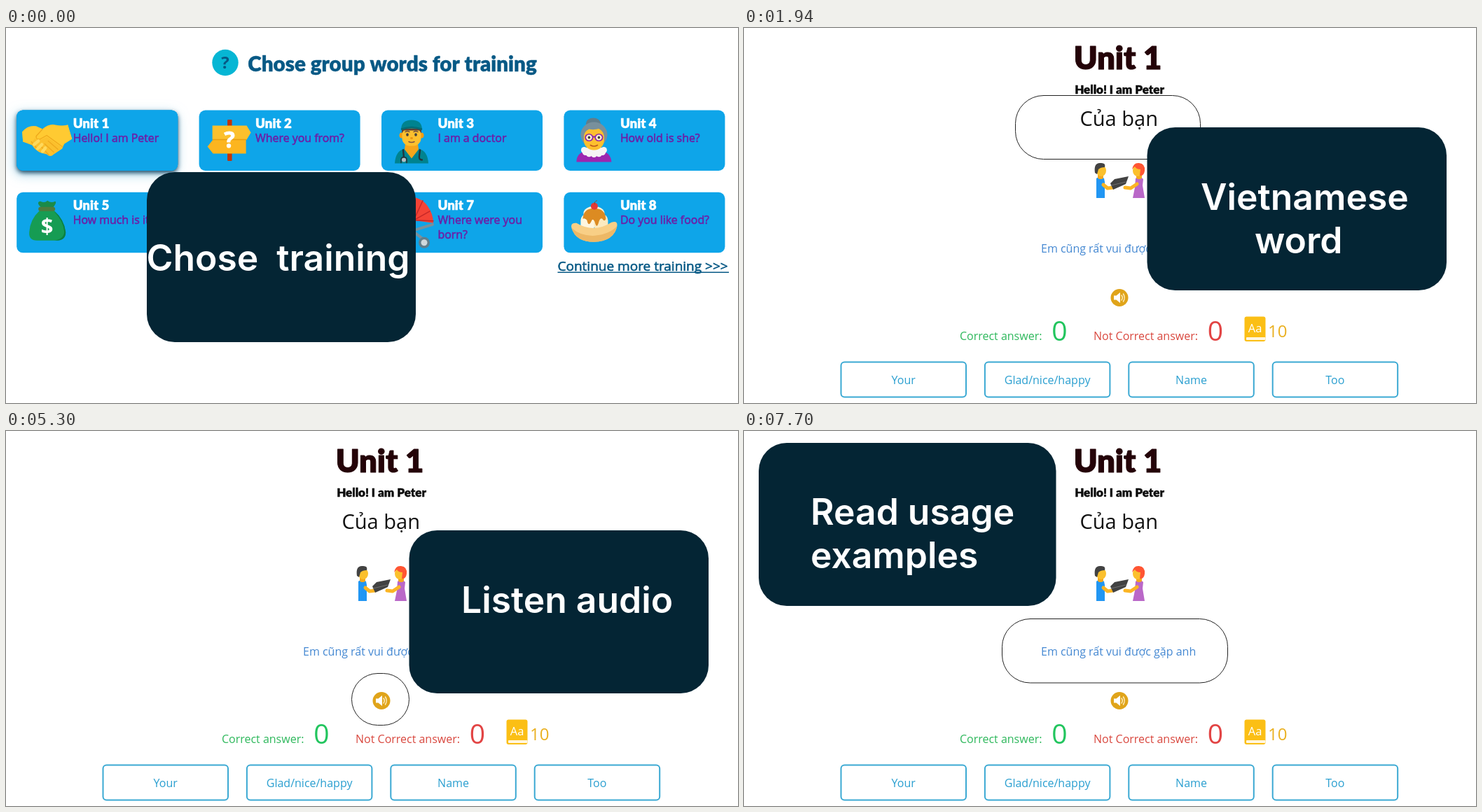
Recreate the animation shown at these times as an HTML page with a canvas. Size 1045x536 px, loop 8 s.

```html
<!DOCTYPE html>
<html lang="en">
<head>
<meta charset="utf-8">
<title>Word training</title>
<style>
html, body { margin: 0; width: 100%; height: 100%; overflow: hidden; background: #fff; }
canvas { display: block; width: 1045px; height: 536px; }
</style>
</head>
<body>
<canvas id="stage"></canvas>
<script>
const W = 1045, H = 536, LOOP = 8000;
const NAVY = '#042534', SKY = '#0ea5e9', DEEP = '#075985', GOLD = '#fcc02e';
const canvas = document.getElementById('stage');
const ctx = canvas.getContext('2d');
const ratio = window.devicePixelRatio || 1;
canvas.width = W * ratio;
canvas.height = H * ratio;

const sans = (size, weight = 400) => `${weight} ${size}px "Open Sans", sans-serif`;
const inter = size => `600 ${size}px Inter, sans-serif`;
const chunky = size => `900 ${size}px Lato, sans-serif`;

// bold adds a thin round outline to soften and thicken the letters
function text(str, x, y, font, color, { align = 'left', bold = 0 } = {}) {
  ctx.font = font;
  ctx.textAlign = align;
  ctx.fillStyle = ctx.strokeStyle = color;
  ctx.fillText(str, x, y);
  if (bold) {
    ctx.lineWidth = bold;
    ctx.lineJoin = 'round';
    ctx.strokeText(str, x, y);
  }
}

function box(x, y, w, h, r, fill) {
  ctx.beginPath();
  ctx.roundRect(x, y, w, h, r);
  ctx.fillStyle = fill;
  ctx.fill();
}

function frame(x, y, w, h, r, color, width) {
  ctx.beginPath();
  ctx.roundRect(x, y, w, h, r);
  ctx.strokeStyle = color;
  ctx.lineWidth = width;
  ctx.stroke();
}

function oval(x, y, rx, ry, fill) {
  ctx.beginPath();
  ctx.ellipse(x, y, rx, ry, 0, 0, Math.PI * 2);
  ctx.fillStyle = fill;
  ctx.fill();
}

function shape(d, fill) {
  ctx.fillStyle = fill;
  ctx.fill(new Path2D(d));
}

function line(d, color, width) {
  ctx.strokeStyle = color;
  ctx.lineWidth = width;
  ctx.lineCap = ctx.lineJoin = 'round';
  ctx.stroke(new Path2D(d));
}

// Icons, drawn from the top left corner of their card
const icons = {
  handshake() {
    shape('M8 31Q16 21 28 23L37 27Q46 19 55 21Q66 23 73 21L79 41L68 48L65 55L53 63Q48 68 43 63L35 61Q27 58 22 50L9 45Z', '#fbc02d');
    shape('M8 31Q16 21 28 23L37 27L27 37Q25 45 35 42L43 38L64 53L68 48L79 41L73 21Q62 24 53 21Q44 20 34 30L20 48L9 45Z', '#ffca32');
    line('M37 27L28 37Q27 43 34 41L43 36L65 52M45 44L59 56M40 48L53 60M35 52L46 64M21 45L30 56', '#efa91c', 1.3);
    line('M25 49L31 44M30 55L36 49M37 59L41 54', '#ffd95c', 4.5);
  },
  sign() {
    box(40.5, 13.5, 6.5, 59, 1, '#bf360c');
    shape('M19 22H68L74 32L68 42H19Z', '#fbc02d');
    shape('M20 42H67V62H20L12 52Z', '#fcb51f');
    line('M20 42H67', '#e79d10', 1.5);
    text('?', 43.5, 53, sans(32, 700), '#fff', { align: 'center', bold: 1 });
  },
  doctor() {
    shape('M19 76Q20 58 33 55H53Q66 58 67 76Z', '#00838f');
    shape('M34 48H52L53 56L43 69L33 56Z', '#f6a51b');
    oval(29, 36, 3.5, 4, '#f39c12');
    oval(57, 36, 3.5, 4, '#f39c12');
    box(29.5, 22, 27, 29, 11, GOLD);
    shape('M29 33V26H57V33L54 29H32Z', '#5d4037');
    shape('M28 28Q28 14 43 14Q58 14 58 28Q43 24 28 28Z', '#00838f');
    line('M29 27Q43 22 57 27', '#006b75', 2.5);
    oval(37, 35, 1.8, 2.2, '#424242');
    oval(49, 35, 1.8, 2.2, '#424242');
    line('M34 31Q37 29 40 31M46 31Q49 29 52 31', '#6d4c41', 1.4);
    oval(43, 40, 2, 1.4, '#e79410');
    line('M39 45Q43 47 47 45', '#795548', 1.5);
    line('M31 57L32 68M55 57L54 65Q53 71 58 71', '#263238', 2.3);
    oval(32, 71, 3, 3, '#b0bec5');
    line('M28 75V71Q28 67 32 67Q36 67 36 71V75', '#263238', 1.6);
  },
  granny() {
    shape('M18 74Q18 61 32 58H54Q67 61 68 74Z', '#9c27b0');
    oval(42, 19, 10.5, 8, '#607d8b');
    oval(43, 35, 19, 18, '#78909c');
    for (let i = 0; i < 7; i++) {
      const a = Math.PI * i / 6;
      oval(43 + Math.cos(a) * 14, 57 + Math.sin(a) * 6, 4.5, 4.5, '#f5f5f5');
    }
    oval(43, 57, 14, 5, '#f5f5f5');
    box(28.5, 25, 29, 32, 14, GOLD);
    shape('M24 36Q25 19 43 20Q61 19 62 36Q57 31 53 25Q45 29 36 27Q28 31 24 36Z', '#78909c');
    for (const x of [36, 50]) {
      oval(x, 39, 6, 5.5, '#8e24aa');
      oval(x, 39, 4.3, 4, '#fff5d0');
      oval(x, 39, 1.8, 2, '#424242');
    }
    line('M42 38H44', '#8e24aa', 2);
    line('M38 50Q43 53 48 50', '#bf5a1c', 1.7);
  },
  money() {
    shape('M35 22Q27 14 34 13Q40 16 44 12Q49 16 55 13Q58 14 52 22Z', '#1a8b49');
    shape('M33 26H53Q68 39 70 57Q70 69 57 69H29Q17 69 18 57Q19 39 33 26Z', '#169c53');
    shape('M55 29Q67 42 68 57Q67 67 54 69H57Q70 69 70 57Q68 39 53 26Z', '#0c7f42');
    box(31, 21, 24, 6, 3, '#4f7a3c');
    text('$', 43.5, 59, sans(31, 700), '#fff', { align: 'center' });
  },
  stroller() {
    shape('M25 8Q54 2 66 20Q74 31 74 44L45 40Z', '#f44336');
    line('M46 40L59 12M46 40L69 27M46 40L74 41', '#c62828', 1.5);
    line('M73 46L44 55L61 68', '#78909c', 4);
    oval(61, 72, 8, 8, '#607d8b');
    oval(61, 72, 4.5, 4.5, '#cfd8dc');
  },
  sundae() {
    oval(43, 30, 15, 10, '#fff3d8');
    box(24, 31, 20, 25, 9, '#fff6df');
    box(43, 31, 20, 25, 9, '#fbeac0');
    shape('M27 38Q28 23 43 23Q59 23 60 38Q58 43 55 38Q52 36 50 42Q47 54 44 42Q41 36 39 42Q35 50 33 40Q30 36 27 38Z', '#dc8b22');
    shape('M11 51Q9 43 18 44Q43 59 68 43Q77 40 76 48Q72 70 43 71Q17 71 11 51Z', '#f8cf86');
    shape('M11 51Q24 63 44 62Q66 60 76 48Q72 70 43 71Q17 71 11 51Z', '#edb866');
    oval(43.5, 20, 5, 5, '#e53935');
    line('M44 17Q43 13 47 12', '#8d4a2b', 1);
  }
};

const units = [
  ['Hello! I am Peter', icons.handshake],
  ['Where you from?', icons.sign],
  ['I am a doctor', icons.doctor],
  ['How old is she?', icons.granny],
  ['How much is it?', icons.money],
  null,
  ['Where were you|born?', icons.stroller],
  ['Do you like food?', icons.sundae]
];

function shadowBox(color, blur, dx, dy) {
  ctx.save();
  ctx.shadowColor = color;
  ctx.shadowBlur = blur * ratio;
  ctx.shadowOffsetX = dx * ratio;
  ctx.shadowOffsetY = dy * ratio;
  box(0, 0, 230, 86.5, 9, SKY);
  ctx.restore();
}

function unitCard(unit, i) {
  if (!unit) return;
  const [label, icon] = unit;
  ctx.save();
  ctx.translate(15.2 + (i % 4) * 260.4, 117.5 + (i > 3 ? 117.3 : 0));
  if (i === 0) {
    shadowBox('rgba(110,190,225,.6)', 17, -2, 5);
    shadowBox('rgba(4,50,80,.85)', 6, 0, 3);
  }
  box(0, 0, 230, 86.5, 9, SKY);
  icon();
  text(`Unit ${i + 1}`, 80.5, 25, chunky(18.7), '#fff', { bold: .5 });
  label.split('|').forEach((row, n) =>
    text(row, 80.5, 45 + n * 21.5, sans(15.9), '#6b21a8', { bold: .6 }));
  ctx.restore();
}

function panel(x, y, w, h, rows) {
  box(x, y, w, h, 40, NAVY);
  for (const [str, tx, ty] of rows) text(str, tx, ty, inter(51.6), '#fff');
}

function menu() {
  oval(313, 49.5, 18.7, 18.7, '#06b6d4');
  text('?', 313, 58, sans(24, 700), DEEP, { align: 'center' });
  text('Chose group words for training', 551.5, 62, chunky(29.6), DEEP, { align: 'center', bold: .4 });
  units.forEach(unitCard);
  text('Continue more training >>>', 787.5, 347, sans(19), DEEP, { bold: .6 });
  box(787.5, 348.5, 244.5, 1.4, 0, DEEP);
  panel(201, 206, 384, 243, [['Chose  training', 200.5, 347]]);
}

function people() {
  shape('M503 215Q508 210 514 215L515 220V243H503Z', '#2196f3');
  line('M513 224L519 229L527 228', '#fbb524', 5);
  box(505, 207, 8, 9, 3, '#f5a81c');
  oval(510, 204, 7, 8, '#fbc02d');
  shape('M501 207Q499 193 508 193Q517 192 515 199Q509 199 506 202L504 209Z', '#424242');
  shape('M559 215Q565 210 570 216L569 225L572 243H555L558 228Z', '#ba68c8');
  line('M561 223L552 229L544 228', '#fbb524', 5);
  box(560, 207, 8, 9, 3, '#f5a81c');
  oval(562, 204, 7, 8, '#fbc02d');
  shape('M554 202Q556 192 564 193Q573 194 572 204Q571 212 565 211L566 202Q560 202 558 198Z', '#ff5533');
  shape('M523 222L529 216L549 212L545 223L527 231Z', '#424242');
  line('M524 225L545 220', '#707070', 1);
}

function audio() {
  oval(536, 385.5, 12.5, 12.5, '#e0a41a');
  shape('M528 382.5H531.5L537 378V393L531.5 388.5H528Z', '#fff');
  line('M539 382Q541.5 385.5 539 389M541.5 380Q545 385.5 541.5 391', '#fff1c9', 1.4);
}

function book() {
  box(714.5, 412.5, 30, 35.5, 3, '#fbbf15');
  box(717, 442, 27.5, 4, 1, '#fff6df');
  text('Aa', 729.5, 434.5, sans(16.5), '#fff', { align: 'center' });
}

function lesson() {
  text('Unit 1', 533.5, 59, chunky(45.5), '#240308', { align: 'center', bold: 1 });
  text('Hello! I am Peter', 536, 94, chunky(17), '#0a0a0a', { align: 'center', bold: .4 });
  text('Của bạn', 479.5, 140, sans(29), '#111');
  people();
  text('Em cũng rất vui được gặp anh', 424, 321, sans(16), '#4488d2');
  audio();
  text('Correct answer:', 308, 446, sans(16), '#2eb85c');
  text('0', 450.3, 446.5, sans(39), '#22c55e', { align: 'center' });
  text('Not Correct answer:', 499, 446, sans(16), '#d9483f');
  text('0', 673, 446.5, sans(39), '#e24444', { align: 'center' });
  book();
  text('10', 748, 442, sans(24), '#eab020');
  ['Your', 'Glad/nice/happy', 'Name', 'Too'].forEach((word, i) => {
    const x = 138.5 + i * 205.4;
    frame(x, 477.5, 178.5, 50, 5, '#3ba9d3', 2);
    text(word, x + 89.2, 508.5, sans(16), '#2a9fd0', { align: 'center' });
  });
}

const ring = (x, y, w, h, r) => frame(x, y, w, h, r, '#222', 1);
const sidePanel = rows => panel(575.5, 142, 427.5, 233, rows);

const scenes = [
  [500, menu],
  [2900, () => {
    lesson();
    ring(387.5, 96.5, 264, 91, 40);
    sidePanel([['Vietnamese', 652, 259.5], ['word', 729, 321.5]]);
  }],
  [5300, () => {
    lesson();
    ring(696.5, 393.5, 90.5, 73.5, 36.7);
    sidePanel([['Total 10', 693.5, 216.5], ['Vietnamese', 630.5, 278.5], ['word', 707, 340.5]]);
  }],
  [7700, () => {
    lesson();
    ring(493.5, 346.5, 82, 74, 37);
    sidePanel([['Listen audio', 650, 259.5]]);
  }],
  [LOOP, () => {
    lesson();
    ring(368.5, 268.5, 322, 91.5, 40);
    panel(21, 17, 424.5, 233, [['Read usage', 95, 133.5], ['examples', 95, 195.5]]);
  }]
];

const start = performance.now();
function draw(now) {
  const t = Math.max(0, now - start) % LOOP;
  ctx.setTransform(ratio, 0, 0, ratio, 0, 0);
  ctx.fillStyle = '#fff';
  ctx.fillRect(0, 0, W, H);
  scenes.find(([end]) => t < end)[1]();
  requestAnimationFrame(draw);
}
draw(start);
</script>
</body>
</html>
```
